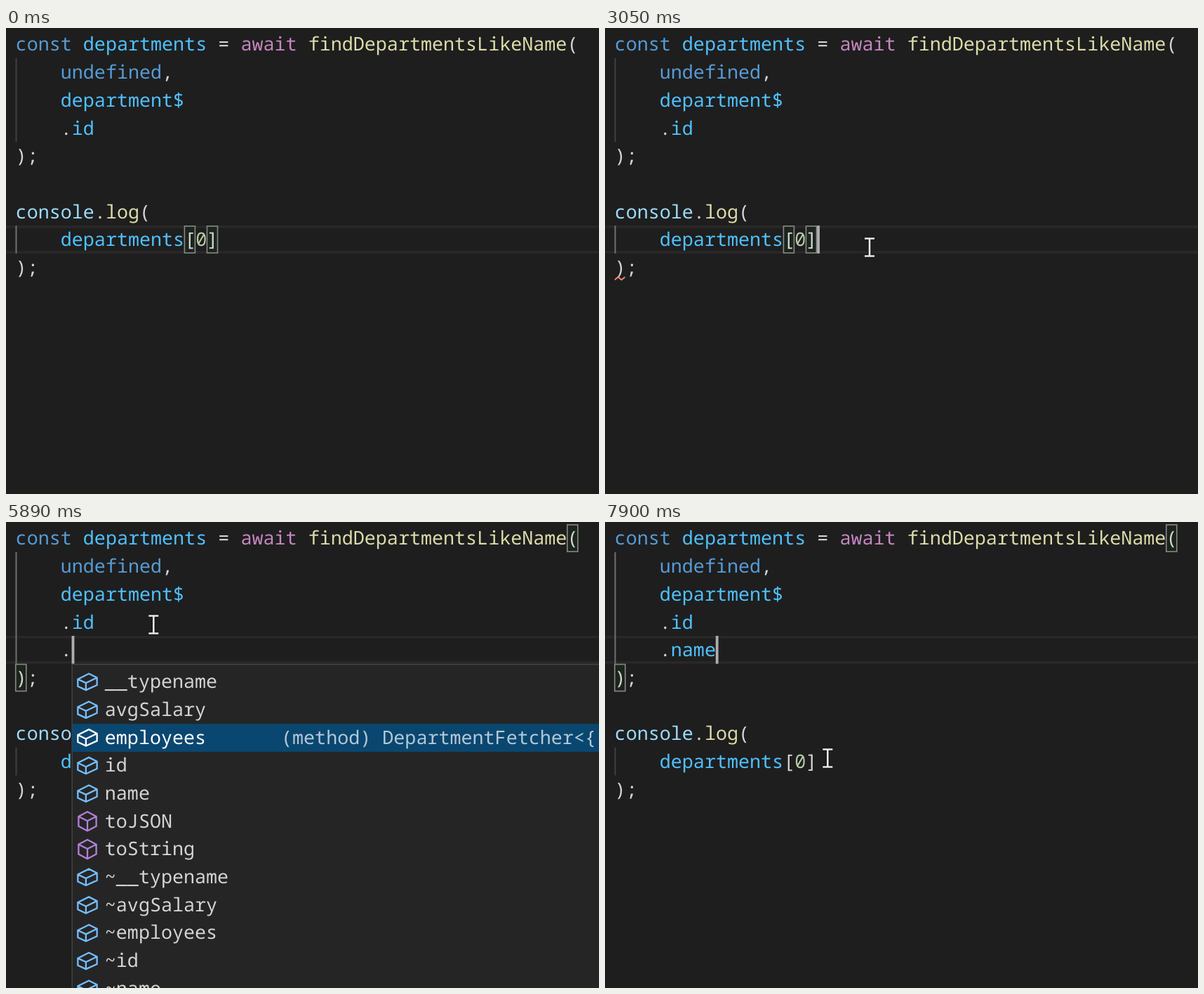
An HTML page that plays this animation: 845x663 px, repeating every 8 s.

```html
<!DOCTYPE html>
<html lang="en">
<head>
<meta charset="utf-8">
<title>Typing in a code editor</title>
<style>
  html, body { margin: 0; width: 100%; height: 100%; overflow: hidden; background: #1e1e1e; }
  svg { display: block; width: 100%; height: 100%; }
  text {
    font: 26.73px "Noto Sans Mono", "DejaVu Sans Mono", monospace;
    white-space: pre;
    text-rendering: geometricPrecision;
  }
</style>
</head>
<body>
<svg id="stage" viewBox="0 0 845 663"></svg>
<script>
const LOOP = 8000;
const X0 = 13.6, CHAR = 16.04, Y0 = 3.2, LINE = 39.7;
const COLOR = {
  keyword: '#569cd6', constant: '#4fc1ff', plain: '#d4d4d4', control: '#c586c0',
  func: '#dcdcaa', variable: '#9cdcfe', number: '#b5cea8',
  field: '#75beff', method: '#b180d7', match: '#18a3ff'
};

const stage = document.getElementById('stage');
const colX = col => X0 + col * CHAR;
const rowY = row => Y0 + row * LINE;
const escapeText = s => s.replace(/&/g, '&amp;').replace(/</g, '&lt;');

const rect = (x, y, w, h, fill, extra = '') =>
  `<rect x="${x}" y="${y}" width="${w}" height="${h}" fill="${fill}" ${extra}/>`;
const text = (x, y, s, fill) =>
  `<text x="${x}" y="${y}" fill="${fill}">${escapeText(s)}</text>`;
const line = (d, stroke, width, extra = '') =>
  `<path d="${d}" fill="none" stroke="${stroke}" stroke-width="${width}" ${extra}/>`;

// A code line is a list of [text, colour name] tokens on the character grid.
function codeLine(row, col, tokens) {
  let out = '';
  for (const [s, color] of tokens) {
    out += text(colX(col), rowY(row) + 29.2, s, COLOR[color]);
    col += s.length;
  }
  return out;
}

const highlightLine = row =>
  rect(0, rowY(row), 845, 3.6, '#282828') + rect(0, rowY(row) + LINE - 3.6, 845, 3.6, '#282828');
const guide = (row, rows, active) =>
  rect(13.5, rowY(row), 2, rows * LINE, active ? '#707070' : '#404040');
const bracketBox = (row, col) =>
  rect(colX(col) + .2, rowY(row) + .8, 15, LINE - 1.6, '#1b251b', 'stroke="#888" stroke-width="1.6"');
const caret = (row, col) => rect(colX(col) - .2, rowY(row), 3.8, LINE, '#aeafad');
const squiggle = row =>
  line(`M14 ${rowY(row) + 37.5}l4.5 -4 5 4 5 -4`, '#f48771', 2);

const ICONS = {
  field: ['M9 2.45L14.5 5.2V10.2L7 13.6L1.5 11V6.2ZM1.5 6.2L7 8.8L14.5 5.2M7 8.8V13.6', 8],
  method: ['M7.5 1.5l6 3.2v6.6l-6 3.2 -6 -3.2v-6.6zM1.5 4.7l6 3 6 -3M7.5 7.7v6.8', 7.5]
};
function icon(kind, x, y, color) {
  const [d, cx] = ICONS[kind];
  return line(d, color, 1.1, `transform="translate(${x} ${y}) scale(2.1) translate(${-cx} -8)"`);
}

function popup({ left, top, pad, items, selected, detail = '', match = '' }) {
  const bottom = top + items.length * LINE + 7;
  let out = rect(left + .7, top + .7, 900, bottom - top - 1.4, '#252526', 'stroke="#454545" stroke-width="1.4"');
  items.forEach((label, i) => {
    const y = top + pad + i * LINE, on = i === selected;
    const kind = label.startsWith('to') ? 'method' : 'field';
    const x = left + 47.3, base = y + 28.3;
    if (on) out += rect(left + 1.4, y, 900, LINE, '#094771');
    out += icon(kind, left + 22.5, y + 19.6, on ? '#fff' : COLOR[kind]);
    out += text(x, base, label, on ? '#fff' : COLOR.plain);
    const hit = match ? label.toLowerCase().lastIndexOf(match) : -1;
    if (hit >= 0) out += text(x + hit * CHAR, base, label[hit], COLOR.match);
    if (on && detail) out += text(left + 298.5, base, detail, '#b5c8d5');
  });
  return out;
}

const MENUS = {
  single: { left: 318, top: 320.8, pad: 1.7, items: ['id'], selected: 0 },
  full: {
    left: 93.5, top: 201.8, pad: 6, selected: 2, detail: '(method) DepartmentFetcher<{',
    items: ['__typename', 'avgSalary', 'employees', 'id', 'name', 'toJSON', 'toString',
      '~__typename', '~avgSalary', '~employees', '~id', '~name']
  },
  filtered: {
    left: 109.5, top: 201.8, pad: 1.7, selected: 0, match: 'n', detail: '(property) DepartmentFetcher<{',
    items: ['name', '~name', '__typename', '~__typename', 'toJSON', 'toString', 'toLocaleString']
  }
};

// Each step changes some fields of the editor state from its time on.
const STEPS = [
  [0, { row: 7, col: 18, caret: false, typed: '', boxes: [[7, 15], [7, 17]] }],
  [720, { caret: true }],
  [1250, { caret: false }],
  [1730, { caret: true, col: 19, typed: '.', boxes: [[6, 11], [8, 0]] }],
  [1800, { menu: 'single' }],
  [2130, { error: true }],
  [2260, { caret: false }],
  [2720, { caret: true }],
  [3050, { col: 18, typed: '', menu: null, boxes: [[7, 15], [7, 17]] }],
  [3550, { caret: false }],
  [3660, { error: false }],
  [3940, { caret: true, row: 3, col: 7, boxes: [] }],
  [4010, { boxes: [[0, 49], [4, 0]] }],
  [4410, { caret: false }],
  [4550, { caret: true, row: 4, col: 4, extra: 1, boxes: [[0, 49], [5, 0]] }],
  [4880, { col: 5, typed: '.' }],
  [5340, { caret: false }],
  [5540, { menu: 'full' }],
  [5890, { caret: true }],
  [6150, { col: 6, typed: '.n' }],
  [6220, { menu: 'filtered' }],
  [6680, { caret: false }],
  [6810, { caret: true, col: 9, typed: '.name', menu: null }],
  [7270, { resolved: true }],
  [7340, { caret: false }],
  [7810, { caret: true }]
];

const easeOut = p => 1 - (1 - p) ** 2;
const easeBoth = p => p * p * (3 - 2 * p);
const MOVES = [
  { start: 120, tick: 67.2, steps: 11, lead: 0, from: [727, 631], to: [377, 312], ease: easeOut },
  { start: 3450, tick: 70, steps: 6, lead: 1, from: [377, 312], to: [210.3, 146], ease: easeBoth },
  { start: 7270, tick: 70, steps: 10, lead: 1, from: [210.3, 146], to: [317.3, 336], ease: easeBoth }
];

function pointer(t) {
  const move = MOVES.filter(m => t >= m.start).pop();
  if (!move) return '';
  const step = Math.floor((t - move.start) / move.tick + 1e-6) + move.lead;
  const p = move.ease(Math.min(1, step / move.steps));
  const [x, y] = move.from.map((a, i) => a + (move.to[i] - a) * p);
  const d = `M${x - 7} ${y - 12.5}h14m-7 0v25m-7 0h14`;
  return line(d, '#151515', 5) + line(d, '#e9e9e9', 2.6);
}

function render(t) {
  const s = { extra: 0 };
  for (const [time, change] of STEPS) if (t >= time) Object.assign(s, change);
  const n = s.extra, below = s.row > 4;

  let out = rect(0, 0, 845, 663, '#1e1e1e') + highlightLine(s.row);
  out += guide(1, 3 + n, !below) + guide(7 + n, 1, below);
  out += s.boxes.map(b => bracketBox(...b)).join('');

  out += codeLine(0, 0, [['const', 'keyword'], [' departments', 'constant'], [' = ', 'plain'],
    ['await ', 'control'], ['findDepartmentsLikeName', 'func'], ['(', 'plain']]);
  out += codeLine(1, 4, [['undefined', 'keyword'], [',', 'plain']]);
  out += codeLine(2, 4, [['department$', 'constant']]);
  out += codeLine(3, 4, [['.', 'plain'], ['id', 'constant']]);
  if (n) out += codeLine(4, 4, [[s.typed.slice(0, 1), 'plain'],
    [s.typed.slice(1), s.resolved ? 'constant' : 'variable']]);
  out += codeLine(4 + n, 0, [[');', 'plain']]);
  out += codeLine(6 + n, 0, [['console', 'variable'], ['.', 'plain'], ['log', 'func'], ['(', 'plain']]);
  out += codeLine(7 + n, 4, [['departments', 'constant'], ['[', 'plain'], ['0', 'number'],
    [']' + (n ? '' : s.typed), 'plain']]);
  out += codeLine(8 + n, 0, [[');', 'plain']]);

  if (s.error) out += squiggle(8);
  if (s.caret) out += caret(s.row, s.col);
  if (s.menu) out += popup(MENUS[s.menu]);
  return out + pointer(t);
}

const begin = performance.now();
let shown = '';
function frame() {
  const markup = render((performance.now() - begin) % LOOP);
  if (markup !== shown) stage.innerHTML = shown = markup;
  requestAnimationFrame(frame);
}
frame();
</script>
</body>
</html>
```
